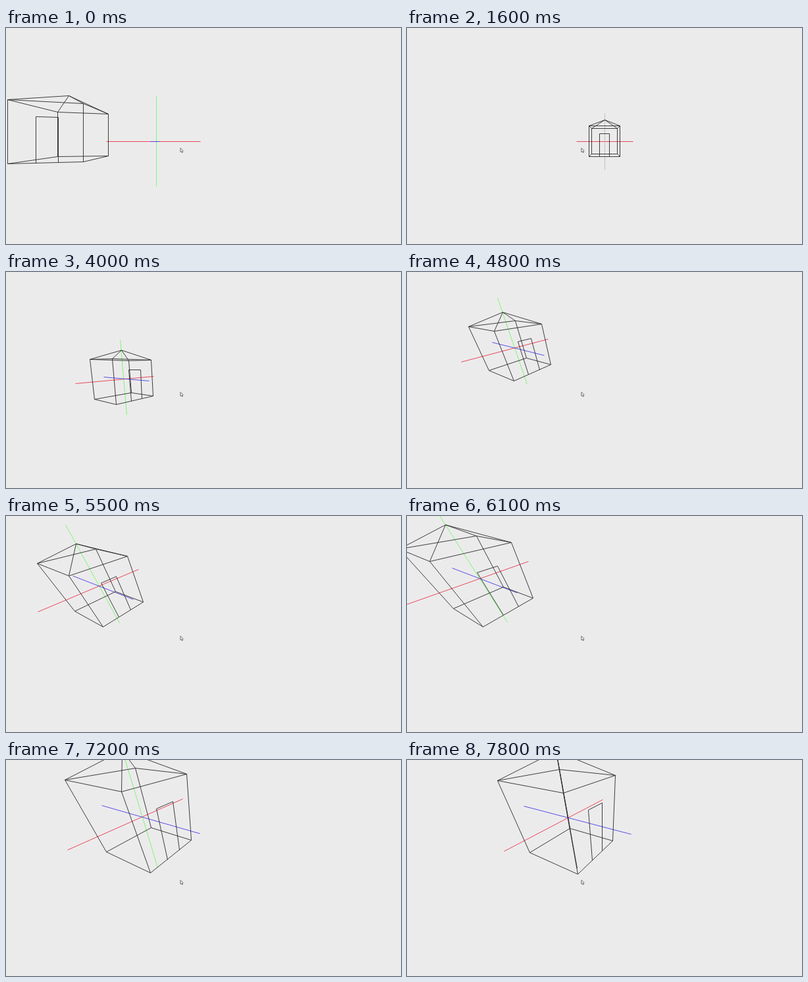
These frames come from a looping animation (600 by 330 pixels, 8000 ms). An HTML page with a canvas:

```html
<!DOCTYPE html>
<html lang="en">
<head>
<meta charset="utf-8">
<title>Wireframe house</title>
<style>
  html, body { margin: 0; width: 100%; height: 100%; overflow: hidden; background: #ecebec; }
  canvas { display: block; }
</style>
</head>
<body>
<canvas id="stage" width="600" height="330"></canvas>
<script>
const ctx = document.getElementById('stage').getContext('2d');
const LOOP = 8000, STEP = 100, FOCAL = 215, CX = 300, CY = 173;
const INK = '#2a2a2a', RED = '#e8364a', GREEN = '#6cfb62', BLUE = '#463ee2', PALE = '#bcbcbc';

// Angles in degrees; x, y, z place the world before the viewer;
// shift slides the house along its own axes
const START = { yaw: 13, pitch: 0, x: -2.09, y: 0, z: 6.32, shift: 1 };

// Each move changes the named values at a constant rate
const MOVES = [
  { from: 0, to: 300, goal: { yaw: 0, x: 0, z: 10, shift: 0 } },               // go home
  { from: 1900, to: 2800, goal: { yaw: 63, x: -4.37, z: 7.1 } },               // orbit
  { from: 3000, to: 3500, goal: { yaw: 60, x: -4.2, z: 7.45 } },               // step back
  { from: 3600, to: 3700, goal: { pitch: 2.8, y: 0.1 } },                      // tilt
  { from: 3800, to: 4000, goal: { pitch: 8.3, y: 0.33 } },
  { from: 4000, to: 4700, goal: { pitch: 30, y: 1.75, z: 6.75 } },
  { from: 4700, to: 5500, goal: { pitch: 43.7, z: 5.7 } },                     // tilt and zoom
  { from: 5600, to: 6500, goal: { x: -4.36, z: 4.19 } },                       // zoom
  { from: 6500, to: 7400, goal: { yaw: 59.5, x: -1.08, y: 1.65 } }             // pan
];

const square = y => [[-1, y, 1], [1, y, 1], [1, y, -1], [-1, y, -1], [-1, y, 1]];
const floor = square(-1), eaves = square(1), apex = [0, 1.5, 0];
const door = [[-0.3, -1, 1], [-0.3, 0.5, 1], [0.3, 0.5, 1], [0.3, -1, 1]];
const posts = floor.slice(1).map((corner, i) => [corner, eaves[i + 1], apex]);
const HOUSE = [floor, eaves, door, ...posts];

function poseAt(t) {
  const pose = { ...START };
  for (const { from, to, goal } of MOVES) {
    const k = Math.max(0, Math.min(1, (t - from) / (to - from)));
    for (const name in goal) pose[name] += (goal[name] - pose[name]) * k;
  }
  return pose;
}

function projector({ yaw, pitch, x: tx, y: ty, z: tz }) {
  const a = yaw * Math.PI / 180, b = pitch * Math.PI / 180;
  const ca = Math.cos(a), sa = Math.sin(a), cb = Math.cos(b), sb = Math.sin(b);
  return ([x, y, z]) => {
    const depth = x * sa - z * ca;
    const scale = FOCAL / (tz + depth * cb - y * sb);
    return [
      CX + (tx + x * ca + z * sa) * scale,
      CY - (ty + y * cb + depth * sb) * scale
    ];
  };
}

function stroke(points, color) {
  ctx.strokeStyle = color;
  ctx.beginPath();
  // Snap to pixel centres for thin, crisp lines
  for (const [x, y] of points) ctx.lineTo(Math.floor(x) + 0.5, Math.floor(y) + 0.5);
  ctx.stroke();
}

function upColor(t) {
  if (t >= 7400) return INK;
  return t >= 1600 && t < 3900 ? PALE : GREEN;
}

function drawCursor() {
  ctx.beginPath();
  for (const [x, y] of [[0, 0], [0, 6], [1.5, 5], [2.5, 7], [3.5, 6.5], [2.7, 4.5], [4, 4]]) {
    ctx.lineTo(265 + x, 183.5 + y);
  }
  ctx.closePath();
  ctx.fillStyle = '#fff';
  ctx.fill();
  ctx.lineWidth = 0.8;
  ctx.strokeStyle = '#444';
  ctx.stroke();
}

function draw(t) {
  const pose = poseAt(t), project = projector(pose);
  ctx.fillStyle = '#ecebec';
  ctx.fillRect(0, 0, 600, 330);
  ctx.lineWidth = 0.9;
  ctx.lineJoin = 'round';

  [RED, upColor(t), BLUE].forEach((color, axis) => {
    const end = s => [0, 1, 2].map(i => i === axis ? s : 0);
    stroke([end(-2), end(2)].map(project), color);
  });
  const dx = -3.3 * pose.shift, dy = 0.3 * pose.shift;
  for (const line of HOUSE) {
    stroke(line.map(([x, y, z]) => project([x + dx, y + dy, z])), INK);
  }
  drawCursor();
}

const begin = performance.now();
function tick() {
  const t = (performance.now() - begin) % LOOP;
  draw(Math.floor(t / STEP) * STEP);
  requestAnimationFrame(tick);
}
tick();
</script>
</body>
</html>
```
